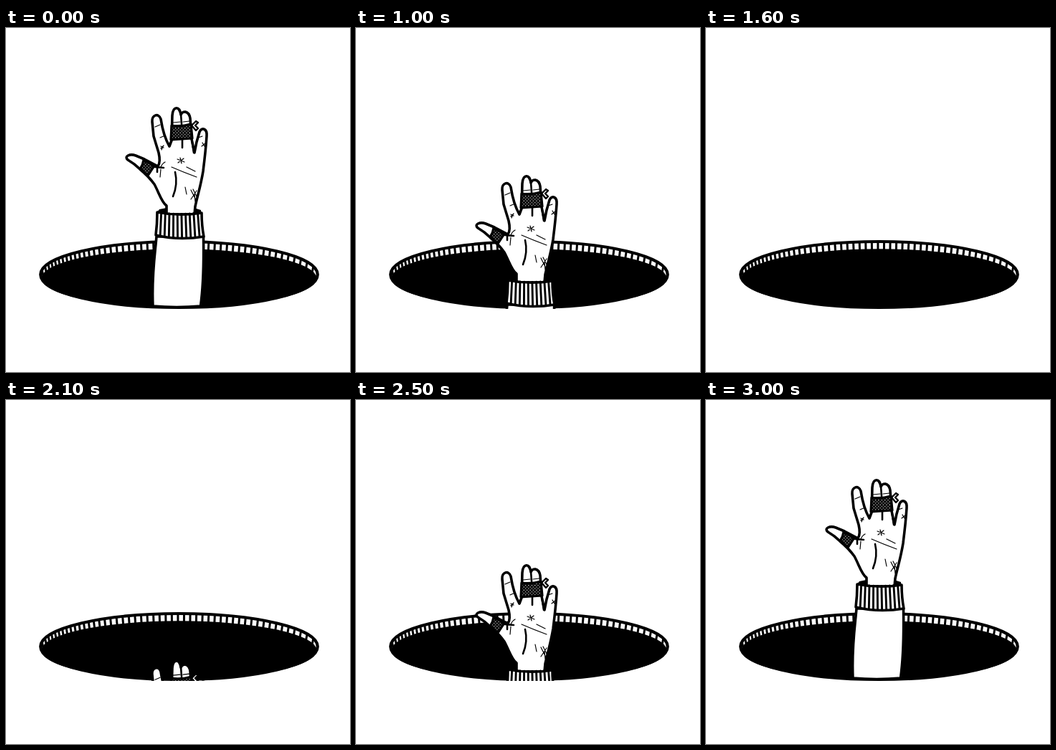
These frames come from a looping animation (480 px wide and 480 px high, 3.7 s). An HTML page:

```html
<!DOCTYPE html>
<html lang="en">
<head>
<meta charset="utf-8">
<title>Hand in a hole</title>
<style>
  html, body { margin: 0; width: 100%; height: 100%; overflow: hidden; background: #fff; }
  svg { display: block; width: 100vw; height: 100vh; }
  path { stroke-linecap: round; stroke-linejoin: round; }
  .outline { fill: #fff; stroke: #000; stroke-width: 3.6; }
  .line { fill: none; stroke: #000; stroke-width: 1.2; }
  .bold { fill: none; stroke: #000; stroke-width: 2.6; }
  .wrap { fill: url(#dots); stroke: #000; stroke-width: 3.2; }
</style>
</head>
<body>
<svg viewBox="0 0 480 480">
  <defs>
    <pattern id="dots" width="4.4" height="4.4" patternUnits="userSpaceOnUse">
      <path d="M0 0H5V5H0Z"/>
      <circle cx="1.1" cy="1.1" r=".7" fill="#fff"/>
      <circle cx="3.3" cy="3.3" r=".7" fill="#fff"/>
    </pattern>
    <clipPath id="front"><path d="M0 0H480V392H0Z"/></clipPath>
    <clipPath id="rim"><ellipse cx="241.5" cy="344" rx="194" ry="47"/></clipPath>
  </defs>

  <ellipse cx="241.5" cy="344" rx="194" ry="46.5" fill="#fff"/>
  <path id="ticks" clip-path="url(#rim)" fill="none" stroke="#000" stroke-width="3"/>
  <ellipse cx="241.5" cy="349.3" rx="192" ry="41"/>
  <ellipse cx="241.5" cy="344" rx="193.3" ry="46" fill="none" stroke="#000" stroke-width="4.2"/>

  <g clip-path="url(#front)">
    <g id="arm">
      <g id="sleeve">
        <path class="outline" d="M210 291C208 315 203 345 205 388Q238 391 271.5 388C276 355 276 320 275.5 291Z"/>
        <path d="M210 258L214 253L224 251H262L272 254L274 280H211Z"/>
      </g>

      <path class="outline" d="M224 260V248C217 243 214 231 207 218Q199 207 187 197
        C181 191 177 188 170 184C164 179 173 175 181 178L193 183L212 193
        Q216 187 213 174L206 151L204 131C203 121 213 118 216 127C218 140 221 153 228 165
        L231 157L232 122C233 109 242 108 244 121C246 115 255 115 257 126L259 155L263 174
        L266 159L270 145C273 138 281 140 280 151C279 166 277 184 275 200C272 219 267 235 264 249L263 260Z"/>
      <path class="bold" d="M228 165L231 157M244 120L245 134M246 156V167M259 155L262 174M208 194L220 195M211 195V201
        M236 201Q240 218 233 235"/>
      <path class="line" d="M208 138L215 135M215 153L222 150M233 132L243 131M247 131L256 130M216 197L215 208
        M222 187Q218 189 216 194M231 194Q247 201 266 208M252 194L264 200M250 222L252 232M268 153L274 151
        M258 226L265 240M261 225L267 237M266 227L258 239M263 232L264 242
        M239 183L249 187M240 188L248 182M243 181L245 189M216 165L220 167M216 168L220 164M217 170L219 165
        M273 165L278 161M274 160L277 165"/>
      <path class="wrap" d="M231 136Q244 138 258 134L260 154Q244 155 230 156Z"/>
      <path class="outline" style="stroke-width:2.4" d="M259 136L265 130L268 132L264 136L268 140L265 143Z"/>
      <path class="wrap" d="M192 184L207 192Q203 198 198 206L187 197Q191 191 192 184Z"/>

      <g id="cuff">
        <path class="outline" d="M211 257Q241 263 273 258Q273 276 276 291Q241 297 209 289Q211 274 211 257Z"/>
        <path id="ribs" fill="none" stroke="#000" stroke-width="2.9"/>
      </g>
    </g>
  </g>
</svg>
<script>
  const $ = id => document.getElementById(id);
  const clamp = (v, lo, hi) => Math.max(lo, Math.min(hi, v));

  // Rim slats: closer together towards the left end
  let slats = '';
  for (let x = 50; x < 434; x += Math.min(8.6, 4.2 + (x - 50) * .045)) {
    const u = (x - 241.5) / 193;
    const y = 344 - 46 * Math.sqrt(1 - u * u);
    slats += `M${x} ${y - 2}l${-3 * u} 15`;
  }
  $('ticks').setAttribute('d', slats);

  let ribs = '';
  for (let i = 1; i < 11; i++) {
    const sag = Math.sin(i / 11 * Math.PI) * 2.5;
    ribs += `M${211 + i * 5.65} ${257 + sag}L${209 + i * 6.1} ${290 + sag}`;
  }
  $('ribs').setAttribute('d', ribs);

  // The arm moves in 100 ms steps, faster once it is deep in the hole
  const drop = step => step === 0 ? 0 : step <= 5 ? 24 * step - 1 : 119 + 33.3 * (step - 5);

  function draw(now) {
    const tick = Math.floor(now % 3700 / 100);
    const step = Math.min(clamp(tick - 6, 0, 10), clamp(30 - tick, 0, 10));
    const shift = `translate(${step ? 1 : 0} 0)`;
    $('arm').setAttribute('transform', `translate(0 ${drop(step)})`);
    $('sleeve').setAttribute('transform', shift);
    $('cuff').setAttribute('transform', shift);
    requestAnimationFrame(() => draw(performance.now()));
  }
  draw(performance.now());
</script>
</body>
</html>
```
